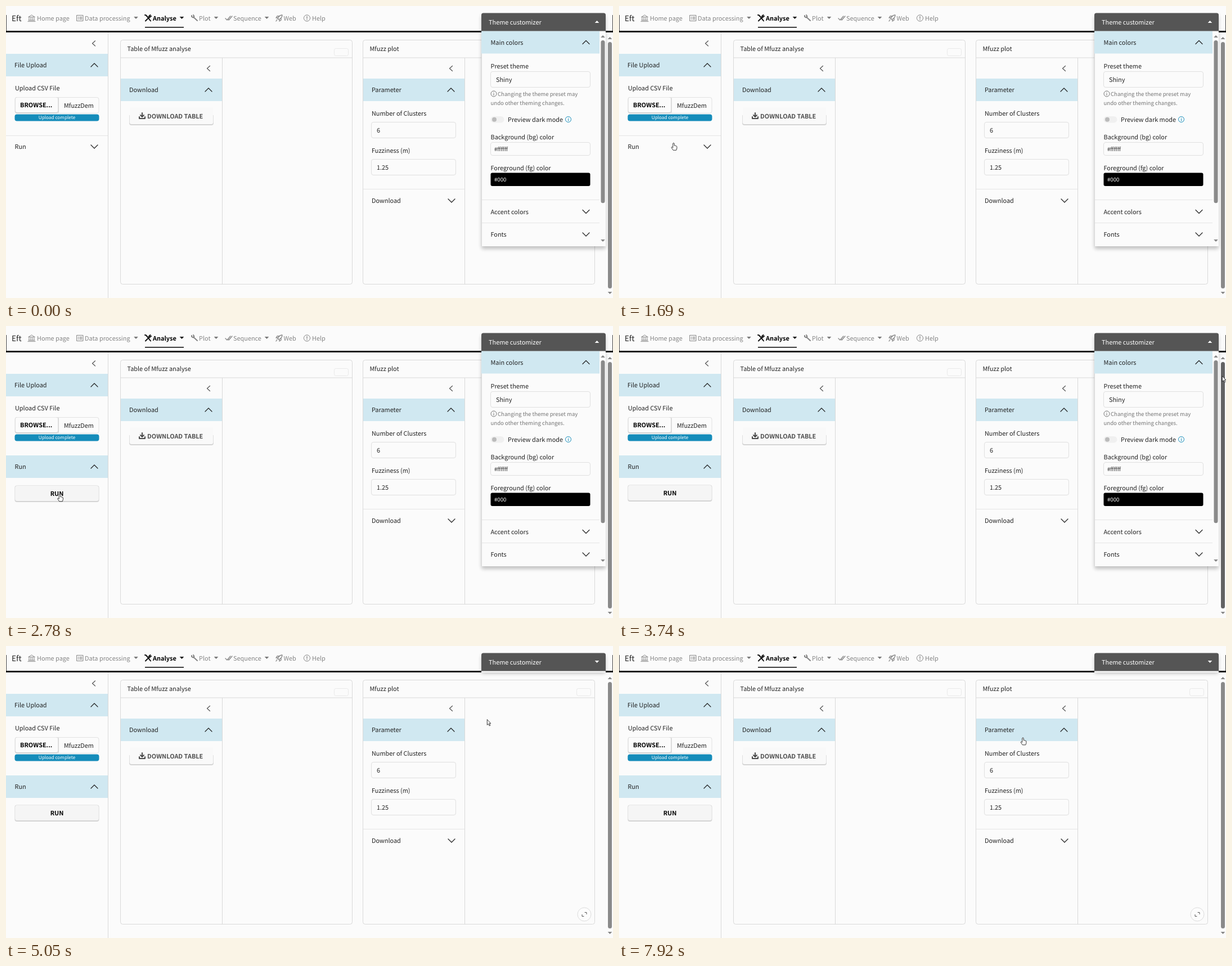
An HTML page that plays this animation: 1079x519 px, repeating every 8 s.

```html
<!DOCTYPE html>
<html lang="en">
<head>
<meta charset="utf-8">
<title>Mfuzz analysis dashboard</title>
<style>
html, body { margin: 0; width: 100%; height: 100%; overflow: hidden; background: #fbfbfb; }
svg { display: block; font: 10.9px "Noto Sans CJK JP", "Noto Sans CJK SC", "Noto Sans CJK", "Open Sans", sans-serif; }
text { fill: #222; white-space: pre; text-rendering: geometricPrecision; }
.line { fill: none; stroke: #d9d9d9; }
.rule { fill: none; stroke: #e5e5e5; }
.icon { fill: none; stroke: #858585; stroke-linejoin: round; stroke-linecap: round; }
.chev { fill: none; stroke: #222; stroke-width: 1.2; stroke-linecap: round; stroke-linejoin: round; }
#shade { filter: blur(3px); }
</style>
</head>
<body>
<svg id="stage" width="1079" height="519" viewBox="0 0 1079 519"></svg>
<script>
const LOOP = 8000, BLUE = '#d0e8f1', BG = '#fbfbfb';
const stage = document.getElementById('stage');

// Markup helpers
const text = (x, y, s, extra = '') => `<text x="${x}" y="${y}" ${extra}>${s}</text>`;
const rect = (x, y, w, h, fill, extra = '') =>
  `<rect x="${x}" y="${y}" width="${w}" height="${h}" fill="${fill}" ${extra}/>`;
const line = (d, extra = '') => `<path class="line" d="${d}" ${extra}/>`;
const rule = d => `<path class="rule" d="${d}"/>`;
const icon = (x, y, d, extra = '') => `<path class="icon" transform="translate(${x} ${y})" d="${d}" ${extra}/>`;
const chevron = (x, y, up, id = '') =>
  `<g transform="translate(${x} ${y})"><path ${id} class="chev" d="M-6 3L0-3L6 3" transform="scale(1 ${up ? 1 : -1})"/></g>`;
const back = (x, y) => `<path class="chev" d="M${x + 2.5} ${y - 4.5}l-5 4.5l5 4.5" style="stroke:#555"/>`;
const header = (x, y, w, label, pad = 15) =>
  rect(x, y, w, 40, BLUE) + text(x + pad, y + 24, label) + chevron(x + w - 24, y + 20, true);
const input = (x, y, w, h, s, size = 10.9) =>
  rect(x + .5, y + .5, w - 1, h - 1, BG, 'stroke="#e0e0e0" rx="3.5"') +
  text(x + (size < 10 ? 7 : 10), y + h / 2 + (size < 10 ? 3.5 : 4), s, `font-size="${size}"`);
const button = (x, y, w, h, fill) =>
  rect(x, y, w, h, '#d4d4d4', 'rx="4"') + rect(x + .7, y + .6, w - 1.4, h - 2.6, fill, 'rx="3.5"');
const caret = (x, y, up, fill, id = '') =>
  `<path ${id} fill="${fill}" transform="translate(${x} ${y}) scale(1 ${up ? -1 : 1})" d="M-3.8-2H3.8L0 2Z"/>`;
const info = (x, y, color) =>
  `<g fill="none" stroke="${color}"><circle cx="${x}" cy="${y}" r="5"/><path d="M${x} ${y - 1}v4M${x} ${y - 3}v1"/></g>`;

function navbar() {
  const gray = 'style="fill:#858585"';
  const item = (x, s) => text(x, 25.5, s, gray);
  return line('M.5 16V44M1078.5 16V44', 'style="stroke:#444"') + rect(0, 44, 1079, 3, '#1c1c1c') +
    text(10, 27, 'Eft', 'font-size="13.6"') +
    icon(39, 15, 'M1 4.5L6.5 1L12 4.5ZM2 6V10M5 6V10M8 6V10M11 6V10M1 10.5H12M0 12.5H13') + item(55, 'Home page') +
    icon(125, 16, 'M1 .5H12V10.5H1ZM3 3.5H4M6 3.5H10M3 5.5H4M6 5.5H10M3 7.5H4M6 7.5H10') + item(140, 'Data processing') +
    caret(231, 21, false, '#777') +
    icon(246, 15, 'M1 1L3 1.5L6 5L11 11.5M2 11.5L8.5 5M8 3.5L10.5 1M9 5.5L12 3', 'style="stroke:#111;stroke-width:2"') +
    text(261, 25.5, 'Analyse', 'font-weight="700" style="fill:#000"') + caret(312.5, 21, false, '#111') +
    rect(247, 37, 69, 1.6, '#111') +
    icon(329, 15, 'M4 4.5L11 11M1 2V4L3.5 5.5L5.5 3.5L4 1', 'style="stroke-width:2"') + item(343, 'Plot') +
    caret(373.5, 21, false, '#777') +
    icon(390, 16, 'M0 6L3 9L9 2M5 8L6 9L12 2', 'style="stroke-width:1.3"') + item(404, 'Sequence') + caret(463.5, 21, false, '#777') +
    icon(479, 15, 'M4 7Q7 1 12 1Q12 6 6 9ZM4 6H1L3 3H6M7 9V12L10 10V7M3 9L1 12', 'style="stroke-width:1.3"') + item(493.5, 'Web') +
    `<circle class="icon" cx="535" cy="21.5" r="5.6"/>` + icon(535, 21, 'M0-2.5V1M0 3V3.4', 'style="stroke-width:1.3"') + item(544, 'Help');
}

function sidebar() {
  return line('M181.5 47V519') + rule('M0 230.5H181') + back(156, 66.5) + header(0, 85, 181, 'File Upload') +
    text(16, 150, 'Upload CSV File') +
    rect(16, 162.5, 149, 28, BG, 'stroke="#e2e2e2" rx="3.5"') + button(16, 162, 77, 29, BG) +
    line('M93.5 163V190') +
    text(25, 179.5, 'BROWSE...', 'font-weight="700" style="fill:#000"') + text(103, 181, 'MfuzzDem') +
    rect(15.5, 192.5, 150, 12, '#158cba', 'rx="4"') +
    text(90.5, 201.3, 'Upload complete', 'font-size="8.2" text-anchor="middle" style="fill:#fff"') +
    `<g id="runBody" clip-path="url(#runClip)"><g id="runButton">${button(15.5, 282.5, 150, 29.5, '#f5f5f5')}
      ${text(90.5, 300.5, 'RUN', 'font-weight="700" text-anchor="middle" style="fill:#000"')}</g></g>` +
    rect(0, 227, 181, 46, '#158cba', 'id="focus"') + rect(0, 230, 181, 40, BLUE, 'id="runHead"') +
    text(15.5, 254, 'Run') + chevron(157, 250, false, 'id="runChev"');
}

function card(x, title, label, id) {
  return `<rect class="line" x="${x + .5}" y="60.5" width="412" height="434" rx="4"/>` +
    line(`M${x} 92H${x + 412}M${x + 181.5} 92V494`) + text(x + 12.5, 80, title) +
    rect(x + 380.5, 75.5, 25, 13, BG, 'stroke="#e9e9e9" rx="3"') +
    back(x + 157, 111) + header(x + 1, 129, 180, label) +
    `<g id="${id}" transform="translate(${x + 394} 477)"><circle r="12" fill="#fcfcfc" stroke="#dcdcdc"/>
      <path class="icon" d="M1-3.5H4V-.5M-4 .5V3.5H-1" style="stroke:#555"/></g>`;
}

function cards() {
  return card(203, 'Table of Mfuzz analyse', 'Download', 'expandA') +
    button(219, 181, 150, 31, BG) + rect(219, 180, 150, 14, BG) + rect(220, 180, 148, 29, '#f9f9f9', 'rx="3"') +
    icon(236, 189, 'M6 1V7M3 5L6 8L9 5M1 8V11H11V8', 'style="stroke:#4a4a4a;stroke-width:2"') +
    text(251, 199.5, 'DOWNLOAD TABLE', 'font-weight="700" style="fill:#505050"') +
    card(634, 'Mfuzz plot', 'Parameter', 'expandB') +
    text(650, 195, 'Number of Clusters') + input(649, 206, 151, 29, '6') +
    text(650, 260.5, 'Fuzziness (m)') + input(649, 272, 151, 29, '1.25') +
    rule('M635 325.5H815') + text(650, 350, 'Download') + chevron(792, 346, false);
}

function customizer() {
  const small = 'font-size="9.6" style="fill:#757575"';
  return rect(845, 17, 221, 0, '#000', 'id="shade" opacity=".22" rx="4"') + rect(845, 44, 221, 3, BG) +
    `<g clip-path="url(#panelClip)">` + rect(845, 44, 221, 383, BG) + line('M845.5 44V427') +
    header(845, 44.5, 210, 'Main colors', 16.5) +
    text(861.5, 111, 'Preset theme') + input(861, 116, 178, 29, 'Shiny') +
    info(867, 156, '#777') + text(874, 160, 'Changing the theme preset may', small) +
    text(861.5, 176, 'undo other theming changes.', small) +
    rect(861.5, 196, 24, 11.5, '#f0f0f0', 'rx="5.7"') + `<circle cx="868" cy="201.7" r="4" fill="#bbb"/>` +
    text(892, 206, 'Preview dark mode') + info(999.5, 201.5, '#158cba') +
    text(861.5, 237, 'Background (bg) color') + input(861, 242, 178, 24, '#ffffff', 9.6) +
    text(861.5, 291.5, 'Foreground (fg) color') + rect(861.5, 296.5, 177, 23.5, '#000', 'rx="3"') +
    text(868, 311.5, '#000', 'font-size="9.6" style="fill:#fff"') +
    rule('M846 344.5H1055M846 385.5H1055') +
    text(861.5, 369.5, 'Accent colors') + chevron(1031, 365.5, false) +
    text(861.5, 410, 'Fonts') + chevron(1031, 406, false) +
    caret(1061, 54, true, '#858585') + caret(1061, 417, false, '#858585', 'id="panelDown"') +
    rect(1057.5, 61, 7, 289, '#8a8a8a', 'id="panelThumb" rx="3.5"') + '</g>' +
    `<path fill="#555" d="M845 44.5V16Q845 12.5 848.5 12.5H1062.5Q1066 12.5 1066 16V44.5Z"/>` +
    text(858, 32.5, 'Theme customizer', 'style="fill:#fff"') + caret(1050.5, 28, true, '#fff', 'id="panelCaret"');
}

const ARROW = 'M.5.5V10.3L2.8 8.2L4.4 11.8L6 11.1L4.4 7.6H7Z';
const HAND = 'M-1.2 7V1.2Q0-.4 1.2 1.2V5L2.8 5.2L4.4 5.7Q6 5.8 5.9 7.5V10L4.8 13.3H-.7L-3.8 8.7Q-3.7 7.2-2.2 7.7L-1.2 8.8Z';

stage.innerHTML = `<defs><clipPath id="runClip">${rect(0, 270, 181, 0, '#000', 'id="runMask"')}</clipPath>
  <clipPath id="panelClip">${rect(845, 44, 221, 383, '#000', 'id="panelMask"')}</clipPath></defs>` +
  rect(0, 0, 1079, 519, BG) + sidebar() + cards() + navbar() +
  caret(1073.5, 57, true, '#858585') + caret(1073.5, 510, false, '#858585') +
  rect(1070, 64, 7, 438, '#8a8a8a', 'id="thumb" rx="3.5"') + customizer() +
  `<path id="cursor" fill="#fff" stroke="#222" stroke-width=".9" stroke-linejoin="round"/>`;

// Motion helpers
const $ = id => document.getElementById(id);
const set = (id, attrs) => { for (const k in attrs) $(id).setAttribute(k, attrs[k]); };
const ramp = (t, start, length) => Math.min(1, Math.max(0, (t - start) / length));
const pulse = (t, start, end, fade) => ramp(t, start, fade) * (1 - ramp(t, end, fade));

// The CSS "ease" curve
function ease(p) {
  if (p <= 0 || p >= 1) return p <= 0 ? 0 : 1;
  let lo = 0, hi = 1;
  for (let i = 0; i < 16; i++) {
    const u = (lo + hi) / 2;
    if (.75 * u * (1 - u) ** 2 + .75 * u * u * (1 - u) + u ** 3 < p) lo = u; else hi = u;
  }
  return .3 * lo * (1 - lo) ** 2 + 3 * lo * lo * (1 - lo) + lo ** 3;
}

// Cursor stops: time, x, y
const stops = [
  [0, 696, -20], [100, 692, -14], [300, 640, 28], [480, 483, 100], [570, 428, 127], [720, 290, 180], [920, 196, 212],
  [940, 196, 212], [1300, 130, 233], [1690, 97, 243], [2050, 97, 243], [2400, 95.5, 298.5], [2930, 95.5, 298.5],
  [3060, 420, 262], [3140, 784, 218], [3200, 1034, 156], [3220, 1100, 140], [3620, 1090, 130], [3780, 1066, 75],
  [4070, 1052, 25.5], [4700, 1052, 25.5], [4880, 940, 85], [5050, 855, 130], [5190, 827, 144], [5320, 827, 144],
  [5820, 795, 158], [6320, 795, 158], [6630, 756.5, 171], [6930, 756.5, 171], [7710, 717, 176],
  [7780, 704, 173], [7920, 718, 162.5], [8000, 718, 162.5]
];
function cursorAt(t) {
  let i = 0;
  while (i < stops.length - 2 && stops[i + 1][0] <= t) i++;
  const [t0, x0, y0] = stops[i], [t1, x1, y1] = stops[i + 1], p = ramp(t, t0, t1 - t0);
  return [x0 + (x1 - x0) * p, y0 + (y1 - y0) * p];
}

// Clickable areas: left, top, right, bottom
const links = [[0, 230, 181, 270], [16, 283, 165, 312], [204, 129, 384, 169], [635, 129, 815, 169], [845, 13, 1066, 44]];

function draw(t) {
  const [x, y] = cursorAt(t);
  const hand = links.some(([l, top, r, b]) => x >= l && x <= r && y >= top && y <= b);
  set('cursor', { d: hand ? HAND : ARROW, transform: `translate(${x} ${y})` });

  const open = ease(ramp(t, 1820, 350));
  set('runHead', { opacity: ramp(t, 1820, 150) });
  set('focus', { opacity: .25 * pulse(t, 1820, 2680, 100) });
  set('runChev', { transform: `rotate(${180 - 180 * ease(ramp(t, 1820, 200))})` });
  set('runMask', { height: 55 * open });
  set('runButton', { transform: `translate(0 ${t >= 2690 && t < 2950 ? 1 : 0})` });

  set('expandA', { opacity: Math.max(pulse(t, 390, 860, 60), pulse(t, 2980, 3100, 50)) });
  set('expandB', { opacity: Math.max(pulse(t, 3110, 3160, 50), ramp(t, 4780, 150)) });
  set('thumb', { fill: x > 1069 && x < 1079 ? '#636363' : '#8a8a8a' });

  const height = 383 * (1 - ease(ramp(t, 4505, 350)));
  const track = Math.max(0, height - 34);
  set('panelMask', { height });
  set('shade', { height: 32 + height });
  set('panelThumb', { height: track * height / 462 });
  set('panelDown', { transform: `translate(1061 ${34 + height})` });
  set('panelCaret', { transform: `translate(1050.5 28) scale(1 ${t < 4510 ? -1 : 1})` });
}

const began = performance.now();
function tick() {
  draw((performance.now() - began) % LOOP);
  requestAnimationFrame(tick);
}
tick();
</script>
</body>
</html>
```
